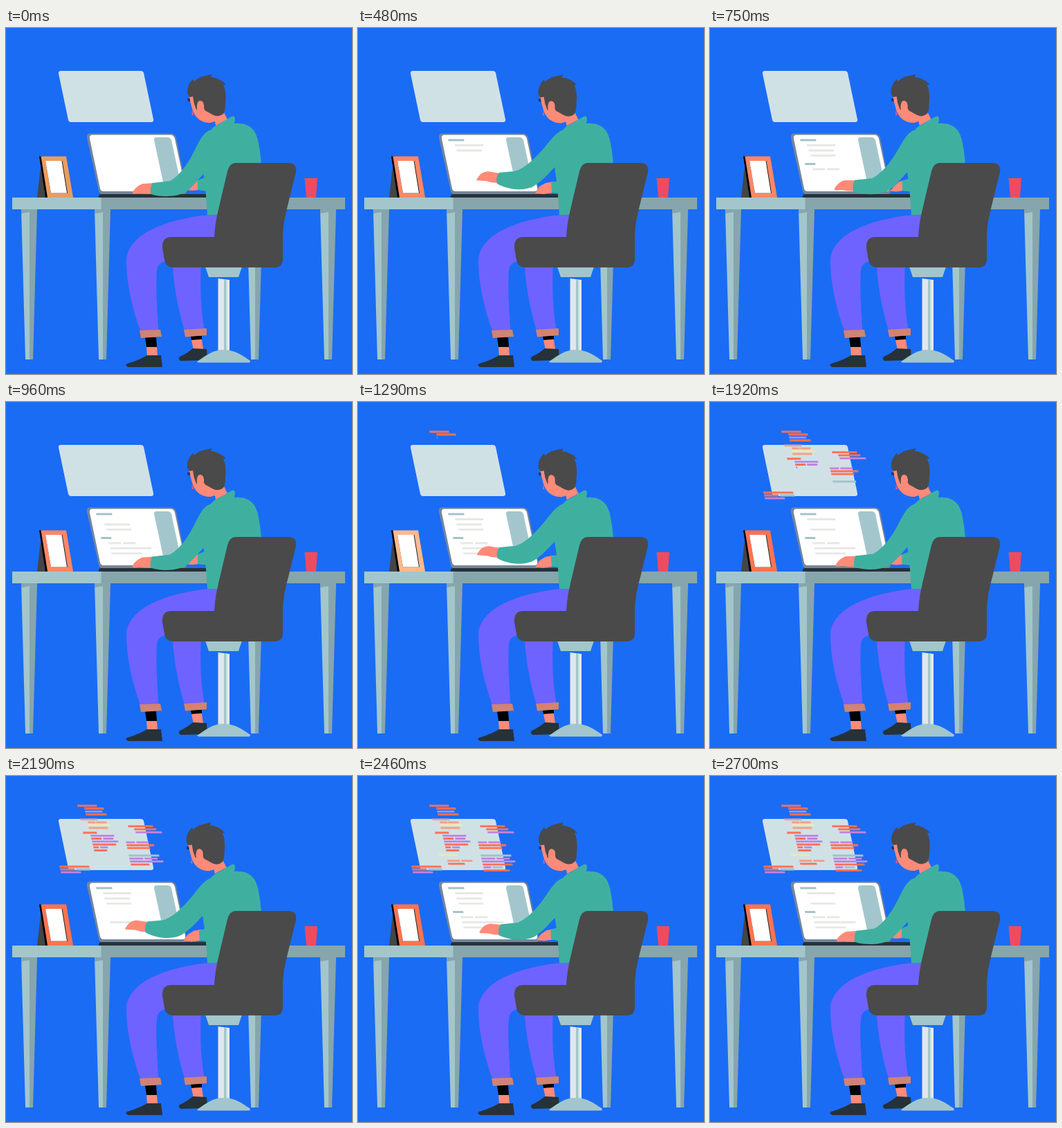
An HTML page that plays this animation: 500 px wide and 500 px high, repeating every 2730 ms.

```html
<!DOCTYPE html>
<html lang="en">
<head>
<meta charset="utf-8">
<title>Working at a desk</title>
<style>
  html, body { margin: 0; width: 100%; height: 100%; overflow: hidden; background: #1a6cf5; }
  svg { display: block; width: 100%; height: 100%; }
</style>
</head>
<body>
<svg viewBox="0 0 500 500">
  <defs>
    <g id="leg">
      <path fill="#a3c6cd" d="M0 0H13L12 217H6Z"/>
      <path fill="#87a5ac" d="M12 0H23L17 217H12ZM0 0H13V4L0 6Z"/>
    </g>
  </defs>
  <rect width="500" height="500" fill="#1a6cf5"/>

  <!-- floating panel -->
  <path fill="#d0e1e6" d="M79 62H195Q198 62 199 65L213 132Q213.500 136 210 136H94Q91 136 90 133L76 66Q75.500 62 79 62Z"/>
  <g id="code"></g>

  <!-- desk -->
  <use href="#leg" x="22" y="262"/>
  <use href="#leg" x="128" y="262"/>
  <use href="#leg" x="348" y="262"/>
  <use href="#leg" x="454" y="262"/>
  <path fill="#a3c6cd" d="M9 245H138V262H9Z"/>
  <path fill="#87a5ac" d="M137.500 245H490V262H137.500Z"/>

  <!-- laptop -->
  <path fill="#74869c" d="M121 152.500H238Q244 152.500 246 159L261 234Q262 240 256 240H139Q135 240 134 235L117 159Q116 152.500 121 152.500Z"/>
  <path fill="#fff" d="M125 154.500H238Q242.500 154.500 244 160L259 231Q260 236 255 236H141Q137 236 136 232L121 160Q120 154.500 125 154.500Z"/>
  <path fill="#a3c6cd" d="M217 158H233Q238 158 239 162L253 227Q253 231 249 231H233Q229 231 228 227L214 162Q214 158 217 158Z"/>
  <g id="page"></g>
  <path fill="#263238" d="M137 240H290V245H134Q133 241 137 240Z"/>

  <!-- picture frame and cup -->
  <path fill="#454545" d="M50 201L58 245H45Z"/>
  <path d="M48 185.500H52L61 245H57Z"/>
  <path id="frame" d="M50.500 185.500H87L97 245H60Z"/>
  <path fill="#222" d="M57 192H81.500L89 238.500H65Z"/>
  <path fill="#fff" d="M57 192H80.500L88 238.500H65Z"/>
  <path fill="#ee4b60" d="M431.500 217H450L448 245H434Z"/>

  <!-- legs and feet -->
  <path d="M201 447H217L218 461H203ZM267 445H283V450L268 451Z"/>
  <path fill="#ff8a78" d="M203 461H218L219 474H204ZM268 451L283 450L285 465H271Z"/>
  <path fill="#263238" d="M175 485Q190 481 204 473L224 473L226 490H177Q171 488 175 485ZM251 475Q262 470 270 463L290 464L291 480L253 481Q248 479 251 475Z"/>
  <path fill="#6f63ff" d="M241 338C241 370 250 410 258 437H287C282 410 280 380 282 338Z"/>
  <path fill="#6f63ff" d="M306 269C255 272 174 290 174 338C174 370 184 410 194 437H220.500C218 400 216.500 375 218 350C219 340 227 337 234 336L306 320Z"/>
  <path fill="#d28371" d="M193 437L223 436L225 446L195 448ZM257 436L290 434V444L259 446.500Z"/>

  <!-- chair stand -->
  <path fill="#a3c6cd" d="M288 345H341L336 360H293Z"/>
  <path fill="#e3e7ea" d="M306.500 362L323 364V468H306.500Z"/>
  <path fill="#a3c6cd" d="M315 363L318.500 363.500V468H315Z"/>
  <path fill="#a3c6cd" d="M276 482C290 473 298 465 315 465C332 465 344 475 353 481L352 483.500H278Z"/>

  <!-- person -->
  <g id="head">
    <path fill="#ff8a78" d="M264 98L270 120Q277 137 295 137L302 135L303 141L320 132L314 120L300 95Z"/>
    <path fill="#ee5a85" d="M269 119L271 126H268.500Z"/>
    <path fill="#263258" d="M262 102.500L265.500 101L266 106L263 106Z"/>
    <path fill="#4a4a4a" d="M265 100L262 95Q261 83 270 74L272 77Q280 69 298 67L296 71Q309 72 318 82L314 82Q319 92 317 110Q317 120 314 124Q307 130 298 125Q288 119 284 118L275 118Q271 109 270 99Z"/>
    <path fill="#ff8a78" d="M276 118Q275 105 281 105Q287 106 286 116L289 122H278Z"/>
  </g>
  <path id="farHand" fill="#ff8a78"/>
  <path id="farSleeve" fill="#3fb0a0"/>
  <path fill="#3fb0a0" d="M296 148Q298 143 309 138L326 128Q331 126 331 132L330 138C352 136 361 148 364 162Q368 180 369 200L340 270H291L288 228L284 201Z"/>
  <path id="hand" fill="#ff8a78"/>
  <path id="arm" fill="#3fb0a0"/>
  <path fill="#4a4a4a" d="M332 195H409Q421 196 419 208L405 265Q400 285 400 303V334Q400 346 388 346H241Q231 346 229 335L226 318Q225 302 239 302H301Q302 282 307 262L320 207Q323 195 332 195Z"/>
</svg>
<script>
const LOOP = 2730, STEP = 30;
const $ = id => document.getElementById(id);
const ink = { o: '#ff7058', p: '#c184e2', s: '#f2a08c', c: '#e9ebb4', t: '#a3c3c9', g: '#e7e7e6' };

// Columns of code: bars [x, y, width, ink] typed one after another at a steady speed.
const columns = [
  { start: 1148, speed: .4, bars: [
    [103, 43, 28, 'o'], [113, 47, 28, 'o'], [114, 51.3, 25, 'p'], [115, 55.5, 30, 'o'],
    [107, 62.8, 25, 's'], [118, 67, 11, 's'], [130, 67, 15, 's'], [118, 71, 33, 'c'],
    [119, 75, 28, 's'], [111, 82, 20, 'o'], [122, 86.3, 34, 'p'], [123, 90.5, 15, 'o'],
    [140, 90.5, 15, 'p'], [124, 94.7, 38, 'p'], [125, 99, 34, 'o'], [126, 103.2, 8, 'o'],
    [136, 103.2, 11, 'p'], [127, 107.5, 19, 'o'], [117, 114.2, 26, 'c'],
    [129, 122.5, 18, 's'], [149, 122.5, 16, 's'], [130, 126.8, 24, 'o']] },
  { start: 1390, speed: .46, bars: [
    [176, 72.6, 36, 'o'], [185, 77, 32, 'o'], [187, 81.3, 38, 'p'], [173, 95.8, 13, 'p'],
    [188, 95.8, 18, 'p'], [174, 100, 40, 'o'], [175, 104.2, 33, 'o'], [177, 115, 44, 't'],
    [178, 119.3, 20, 'p'], [200, 119.3, 19, 'p'], [179, 123.5, 48, 'p'], [180, 127.8, 43, 'o'],
    [181, 132, 11, 'p'], [194, 132, 15, 't'], [181, 136.3, 38, 'o']] },
  { start: 1330, speed: .46, bars: [
    [77, 131, 43, 'o'], [78, 135, 21, 'o'], [101, 135, 21, 't'], [79, 139.2, 29, 'p']] }
];

// Laptop lines: [x, y, width, ink, typing start, ...times around which the line blinks out]
const lines = [
  [130, 162, 23, 't', 60, 1590], [140, 169.5, 41, 'g', 180, 960],
  [142, 177, 37, 'g', 330, 1920, 2700], [145, 184.3, 36, 'g', 490],
  [137, 196.5, 15, 't', 600, 2190], [148, 204, 18, 'g', 660, 2190],
  [169, 204, 18, 'g', 710, 1590, 2190], [150, 211.3, 60, 'g', 760],
  [152, 218.8, 44, 'g', 850, 1590, 2190]
];

const addBar = (group, x, y, color) => {
  const bar = document.createElementNS('http://www.w3.org/2000/svg', 'path');
  bar.setAttribute('fill', ink[color]);
  bar.setAttribute('transform', `translate(${x} ${y - 1.4})`);
  group.append(bar);
  return bar;
};
const setWidth = (bar, w) => bar.setAttribute('d', w > 0 ? `M0 0H${w}l.6 2.8H.6Z` : '');
const clamp = (v, max) => Math.max(0, Math.min(v, max));

const typed = columns.flatMap(({ start, speed, bars }) => {
  let begin = start;
  return bars.map(([x, y, w, color]) => {
    const item = { bar: addBar($('code'), x, y, color), w, begin, speed };
    begin += w / speed;
    return item;
  });
});
const pageBars = lines.map(([x, y, w, color, begin, ...blinks]) =>
  ({ bar: addBar($('page'), x, y, color), w, begin, blinks }));

// Resting and reaching outlines share one structure so their numbers can be mixed.
const poses = {
  arm: ['M297 147C285 150 280 162 272 178C262 198 250 214 237 221L211 224Q208 232 209 240C225 245 245 244 258 238C268 232 277 220 287 209L310 190Z',
        'M297 147C288 150 281 158 270 172C256 188 240 204 226 207L204 209Q198 215 201 225C217 234 239 236 253 229C265 222 276 210 285 200L310 190Z'],
  hand: ['M183 238Q184 234 189 230Q195 225 199 225L213 224L212 240Q199 240 193 239L184 240Z',
         'M171 219Q174 214 178 210Q183 207 188 207L205 210L202 224Q194 224 186 221L172 220Z'],
  farHand: ['M262 234L268 228L275 221L279 220L279 234L269 235Z',
            'M256 239L262 229L271 224L282 222L282 238L268 240Z'],
  farSleeve: ['M277 220L290 215L292 236L277 234Z',
              'M279 223L290 221L292 239L280 238Z']
};
const mix = ([from, to], p) => {
  const ends = to.match(/[\d.]+/g);
  let i = 0;
  return from.replace(/[\d.]+/g, n => +n + (ends[i++] - n) * p);
};

const frameColor = t =>
  t < 240 ? '#eb9c5f' : t < 1290 ? '#ff8765' : t < 1740 ? '#ffb98c' : '#ff7350';

function draw(t) {
  const reach = (1 - Math.cos(t / LOOP * 6 * Math.PI)) / 2;
  for (const id in poses) $(id).setAttribute('d', mix(poses[id], reach));
  $('head').setAttribute('transform', `translate(${-1.5 * reach} ${.4 * reach})`);
  $('frame').setAttribute('fill', frameColor(t));
  for (const { bar, w, begin, speed } of typed) setWidth(bar, clamp((t - begin) * speed, w));
  for (const { bar, w, begin, blinks } of pageBars) {
    const hidden = blinks.some(b => Math.abs(t - b) < 80);
    setWidth(bar, hidden ? 0 : clamp((t - begin) * .45, w));
  }
}

function tick() {
  draw(Math.floor(performance.now() % LOOP / STEP) * STEP);
  requestAnimationFrame(tick);
}
tick();
</script>
</body>
</html>
```
